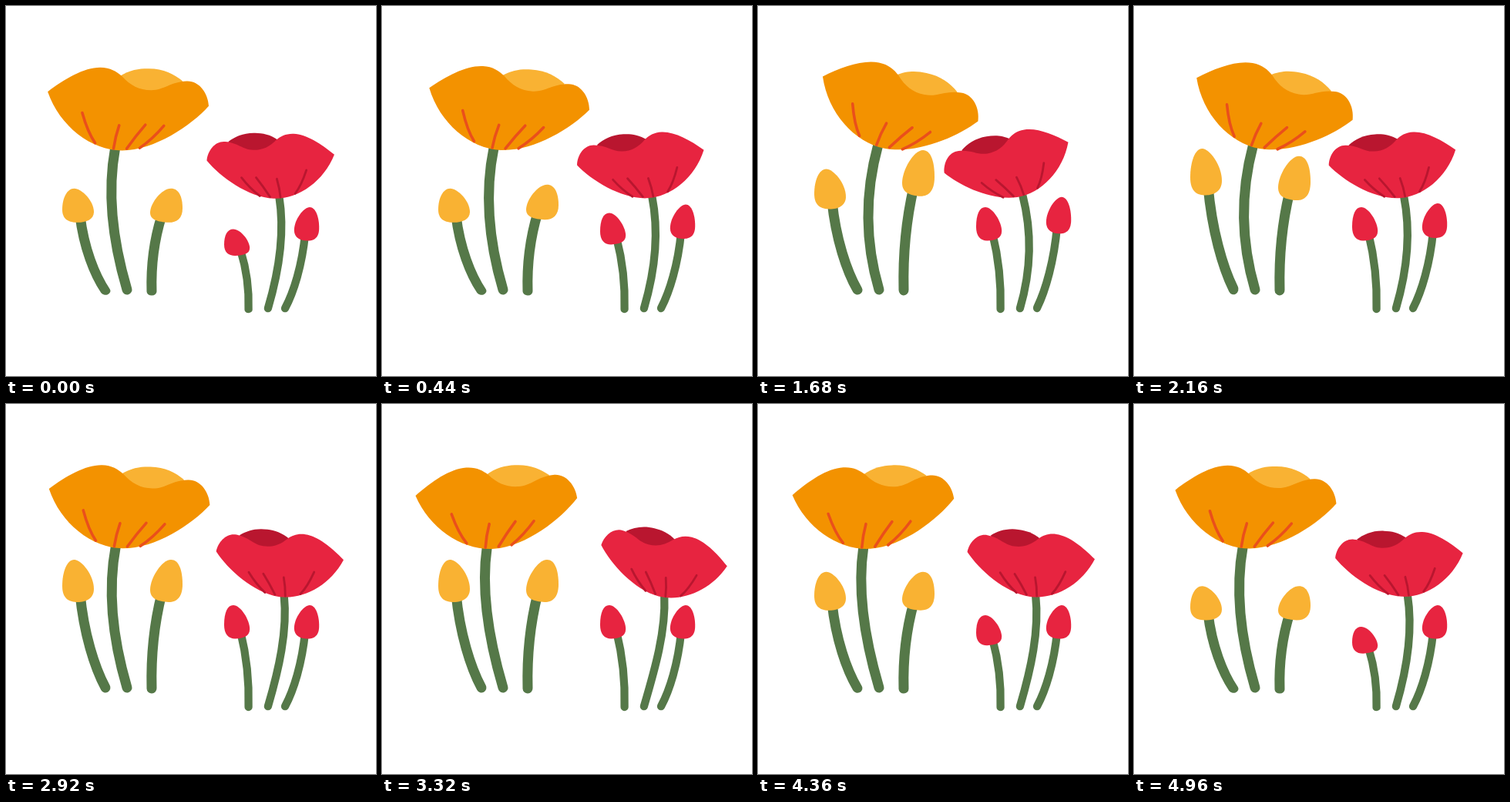
These frames come from a looping animation (480x480 px, 5 s). An HTML page:

```html
<!DOCTYPE html>
<html lang="en">
<head>
<meta charset="utf-8">
<title>Swaying poppies</title>
<style>
  html, body { margin: 0; width: 100%; height: 100%; overflow: hidden; background: #fff; }
  svg { display: block; width: 100vw; height: 100vh; }
  path { stroke-linecap: round; }
  .stem { fill: none; stroke: #557848; stroke-width: 13; }
  .vein { fill: none; stroke-width: 3.6; }
</style>
</head>
<body>
<svg id="stage" viewBox="0 0 480 480"></svg>
<script>
const LOOP = 5000;
const GROUND = 376;          // buds stretch up from this line
const HUB = [157.5, 120.5];  // the head turns about this point
const DRIFT = 2.38;          // sideways travel of the head per degree

// One plant, drawn twice: the red one is mirrored and smaller.
const plants = [
  {
    place: '', petal: '#f39200', back: '#f9b233', vein: '#ea4f1b', bud: '#f9b233',
    sway: { min: -7.3, max: 13.2, low: 3600, high: 1940 },
    grow: [{ small: 0.8, from: 1220, peak: 2170 }, { small: 0.8, from: 300, peak: 1750 }]
  },
  {
    place: 'translate(463.9 101.5) scale(-0.79 0.79)',
    petal: '#e72440', back: '#b9162f', vein: '#b9162f', bud: '#e72440',
    sway: { min: -15.4, max: 12.4, low: 3410, high: 1460 },
    grow: [{ small: 1, from: 0, peak: 1720 }, { small: 0.793, from: 0, peak: 880 }]
  }
];

const plantMarkup = p => `
  <g transform="${p.place}">
    <path class="stem"/>
    <g>
      <path fill="${p.back}" d="M145 92C160 82 172 81 184 81C203 81 217 88 228 97L212 112L187 120L160 112Z"/>
      <path fill="${p.petal}" d="M53 112C75 95 100 80 121 80C134 80 142 85 149 91C160 103 172 109 187 109C204 109 212 98 233 97C249 96 261 112 262 129C239 155 192 187 150 187.500C110 187.500 69 157 53 112Z"/>
      <path class="vein" stroke="${p.vein}" d="M98 139C102 153 108 168 115 178M146 155Q141 170 139 185M180 154Q168 168 156 185M204 155Q190 172 173 184"/>
    </g>
    <g>
      <path class="stem" d="M96 246C101 298 115 342 129 368"/>
      <path fill="${p.bud}" d="M88.500 202C98 202 114 222 114 240C114 252 104 257 93 257C82 257 73 253 73 236C73 218 79 202 88.500 202Z"/>
    </g>
    <g>
      <path class="stem" d="M202 246C191 290 188 330 189 369"/>
      <path fill="${p.bud}" d="M214 202C224 202 229 215 229 234C229 250 222 257 211 257C197 256 187 253 187 241C187 226 202 202 214 202Z"/>
    </g>
  </g>`;

const wrap = t => (t % LOOP + LOOP) % LOOP;
const ramp = (t, t0, t1, a, b) => a + (b - a) * Math.min(1, Math.max(0, (t - t0) / (t1 - t0)));

// Slow, slightly accelerating swing one way, quick even swing back.
function swayAt({ min, max, low, high }, t) {
  const rise = wrap(high - low), since = wrap(t - low);
  const k = since < rise ? (since / rise) ** 1.12 : 1 - (since - rise) / (LOOP - rise);
  return min + (max - min) * k;
}

// Shoot up past full size, settle, then shrink again.
function growAt({ small, from, peak }, t) {
  if (t < peak) return ramp(t, from, peak, small, 1.1);
  if (t < 3850) return ramp(t, peak, peak + 700, 1.1, 1);
  return ramp(t, 3850, 4980, 1, small);
}

function stemPath(deg) {
  const a = deg * Math.PI / 180, c = Math.cos(a), s = Math.sin(a);
  const dx = -16.5, dy = 64.5;
  const x = HUB[0] + DRIFT * deg + dx * c - dy * s;
  const y = HUB[1] + dx * s + dy * c;
  return `M${x} ${y}C${130.5 + 0.68 * deg} 244 139 307 157 368`;
}

const stage = document.getElementById('stage');
stage.innerHTML = plants.map(plantMarkup).join('');

function draw(t) {
  plants.forEach((p, i) => {
    const [stem, head, ...buds] = stage.children[i].children;
    const deg = swayAt(p.sway, t);
    stem.setAttribute('d', stemPath(deg));
    head.setAttribute('transform', `translate(${DRIFT * deg} 0) rotate(${deg} ${HUB})`);
    buds.forEach((bud, j) => {
      const s = growAt(p.grow[j], t);
      bud.setAttribute('transform', `translate(0 ${GROUND * (1 - s)}) scale(1 ${s})`);
    });
  });
}

const start = performance.now();
function tick() {
  draw((performance.now() - start) % LOOP);
  requestAnimationFrame(tick);
}
draw(0);
requestAnimationFrame(tick);
</script>
</body>
</html>
```
